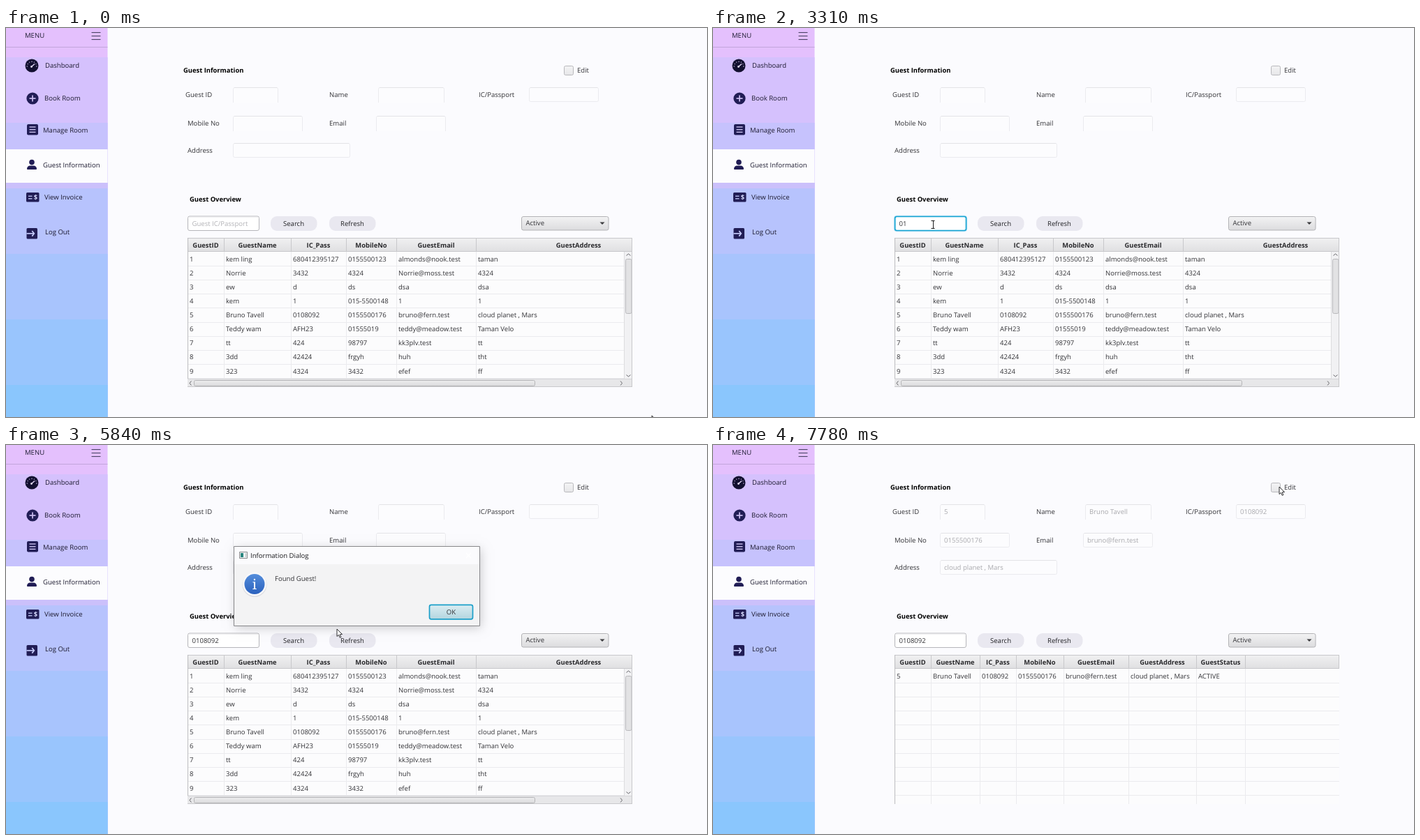
Animation, 1004 px wide and 558 px high, one loop 8 s. Source, as an HTML page with a canvas:

```html
<!DOCTYPE html>
<html lang="en">
<head>
<meta charset="utf-8">
<title>Guest Information</title>
<style>
html, body { margin: 0; width: 100%; height: 100%; overflow: hidden; background: #fbfbfe; }
canvas { display: block; }
</style>
</head>
<body>
<canvas id="stage" width="1004" height="558"></canvas>
<script>
const ctx = document.getElementById('stage').getContext('2d');
const LOOP = 8000, TICK = 76;
const FACE = '"Open Sans", "Noto Sans", sans-serif';
const NAVY = '#211d55', INK = '#333337', PAGE = '#fbfbfe', GRID = '#ebebee', EDGE = '#c8c8cb', GLYPH = '#66666a';

const GUEST_ID = '0108092';
const GUEST = ['5', 'Bruno Tavell', GUEST_ID, '0155500176', 'bruno@fern.test', 'cloud planet , Mars', 'ACTIVE'];
const HEADS = ['GuestID', 'GuestName', 'IC_Pass', 'MobileNo', 'GuestEmail', 'GuestAddress', 'GuestStatus'];
const ROWS = [
  ['1', 'kem ling', '680412395127', '0155500123', 'almonds@nook.test', 'taman'],
  ['2', 'Norrie', '3432', '4324', 'Norrie@moss.test', '4324'],
  ['3', 'ew', 'd', 'ds', 'dsa', 'dsa'],
  ['4', 'kem', '1', '015-5500148', '1', '1'],
  GUEST.slice(0, 6),
  ['6', 'Teddy wam', 'AFH23', '01555019', 'teddy@meadow.test', 'Taman Velo'],
  ['7', 'tt', '424', '98797', 'kk3plv.test', 'tt'],
  ['8', '3dd', '42424', 'frgyh', 'huh', 'tht'],
  ['9', '323', '4324', '3432', 'efef', 'ff']
];

// moments of each event, in ms
const FOCUS = 1380, HOVER = 5330, PRESS = 5430, DIALOG = 5740, CLOSE = 6680, RESULT = 6760;
const KEYS = [2080, 2700, 3470, 3850, 4090, 4410, 4950];
const BLINK = 605;

// the pointer's moves, each an eased and slightly bowed run to the next stop
const HOME = { x: 925, y: 556 };
const MOVES = [
  { from: 0, to: 760, x: 329, y: 314, bow: 36 },
  { from: 760, to: 1290, x: 315, y: 282, bow: 0 },
  { from: 5010, to: 5400, x: 408, y: 280, bow: 0 },
  { from: 5610, to: 6380, x: 650, y: 243, bow: -8 },
  { from: 6810, to: 7300, x: 808, y: 34, bow: -25 },
  { from: 7380, to: 7750, x: 811, y: 60, bow: 0 }
];

function pointerAt(t) {
  let { x, y } = HOME;
  for (const m of MOVES) {
    if (t < m.from) break;
    const k = 1 - (1 - Math.min(1, (t - m.from) / (m.to - m.from))) ** 1.3;
    x += (m.x - x) * k;
    y += (m.y - y) * k + m.bow * 4 * k * (1 - k);
  }
  return [Math.round(x), Math.round(y)];
}

function rect(x, y, w, h, fill) {
  ctx.fillStyle = fill;
  ctx.fillRect(x, y, w, h);
}

function box(x, y, w, h, r, fill, stroke, width = 1) {
  ctx.beginPath();
  ctx.roundRect(x, y, w, h, r);
  if (fill) { ctx.fillStyle = fill; ctx.fill(); }
  if (stroke) { ctx.strokeStyle = stroke; ctx.lineWidth = width; ctx.stroke(); }
}

function line(color, width, ...p) {
  ctx.beginPath();
  for (let i = 0; i < p.length; i += 2) ctx.lineTo(p[i], p[i + 1]);
  ctx.strokeStyle = color;
  ctx.lineWidth = width;
  ctx.stroke();
}

function shape(fill, ...p) {
  ctx.beginPath();
  for (let i = 0; i < p.length; i += 2) ctx.lineTo(p[i], p[i + 1]);
  ctx.closePath();
  ctx.fillStyle = fill;
  ctx.fill();
}

function disc(x, y, r, fill) {
  ctx.beginPath();
  ctx.arc(x, y, r, 0, Math.PI * 2);
  ctx.fillStyle = fill;
  ctx.fill();
}

function fade(y0, y1, a, b) {
  const g = ctx.createLinearGradient(0, y0, 0, y1);
  g.addColorStop(0, a);
  g.addColorStop(1, b);
  return g;
}

function text(s, x, mid, color = INK, bold = false, align = 'left') {
  ctx.font = bold ? `700 9.4px ${FACE}` : `9.55px ${FACE}`;
  ctx.textAlign = align;
  ctx.fillStyle = color;
  ctx.fillText(s, x, Math.round(mid + 3));
}

// small arrow head pointing along (dx, dy)
function chevron(x, y, dx, dy, size, color, width) {
  const tip = size * .8;
  line(color, width, x - dx * tip - dy * size, y - dy * tip - dx * size, x, y,
    x - dx * tip + dy * size, y - dy * tip + dx * size);
}

function sidebar() {
  for (let i = 0; i < 7; i++) {
    const y = i && 42 + 94 * (i - 1);
    rect(0, y, 145.5, 558 - y, `rgb(${228 - 15 * i}, ${192 + i}, 253)`);
  }
  rect(0, 174, 145.5, 48, '#fcfcfe');
  rect(0, 222, 145.5, 8, '#cbc0fb');
  rect(0, 27, 145.5, 1, '#c3a6dc');
  for (const y of [6.5, 11.5, 16.5]) line('#4b4463', 1.1, 122.5, y, 135.5, y);

  const item = (s, x, y) => text(s, x, y, '#1d1b30');
  item('MENU', 27, 11);
  item('Dashboard', 56, 54);
  item('Book Room', 55, 101);
  item('Manage Room', 53, 147);
  item('Guest Information', 53, 197);
  item('View Invoice', 55, 243);
  item('Log Out', 56, 293);

  disc(37, 54, 9.5, '#131030');
  for (let i = 0; i < 7; i++) {
    const a = Math.PI * (1 + i / 6);
    disc(37 + 6.8 * Math.cos(a), 55 + 6.8 * Math.sin(a), .7, '#d9c9f2');
  }
  line('#e8dcfa', 1.4, 36.5, 55.5, 41, 51.5);
  disc(36.5, 55.5, 1.4, '#e8dcfa');

  disc(38, 101, 8.6, NAVY);
  line('#cbbdf0', 1.7, 33.5, 101, 42.5, 101);
  line('#cbbdf0', 1.7, 38, 96.5, 38, 105.5);

  box(30, 138, 16, 15.5, 2, NAVY);
  for (let y = 142; y < 150; y += 3.7) line('#d6cdf8', 1.3, 33.5, y, 42.5, y);

  disc(37, 192.6, 3.8, NAVY);
  box(30, 197.5, 14, 5.5, [5, 5, 1, 1], NAVY);

  box(29, 236, 18.5, 13.5, 1.5, NAVY);
  for (const y of [241.2, 244.8]) line('#c5cbfb', 1.3, 32, y, 37.5, y);
  text('$', 42.5, 243, '#d5d9fc', true, 'center');

  box(29.5, 287, 15.5, 15.5, 1.5, NAVY);
  line('#c5cbfb', 1.7, 29.5, 294.8, 40, 294.8);
  chevron(40.3, 294.8, 1, 0, 3.8, '#c5cbfb', 1.7);
}

// an open field shows no lower edge
function formField(label, labelX, x, y, w, open, value) {
  text(label, labelX, y + 11);
  ctx.save();
  ctx.beginPath();
  ctx.rect(x - 2, y - 2, w + 4, open ? 24 : 30);
  ctx.clip();
  box(x + .5, y + .5, w - 1, open ? 28 : 20, 2, '#fcfcfe', '#ebebef');
  rect(x + 2, y, w - 4, 1, '#e3e3e7');
  ctx.restore();
  text(value, x + 6, y + 11, '#a9a9ad');
}

function form(found) {
  const [id, name, pass, mobile, email, address] = GUEST.map(s => found ? s : '');
  text('Guest Information', 254, 61, '#000', true);
  box(799.5, 54.5, 13, 13, 2, fade(54, 68, '#f4f4f5', '#e6e6e8'), '#b8b8bc');
  text('Edit', 818, 61);
  formField('Guest ID', 257, 325, 85, 65, true, id);
  formField('Name', 463, 533, 85, 95, true, name);
  formField('IC/Passport', 677, 749, 85, 100, false, pass);
  formField('Mobile No', 260, 325, 126, 100, !found, mobile);
  formField('Email', 463, 530, 126, 100, !found, email);
  formField('Address', 260, 325, 165, 168, false, address);
}

function button(label, x, hot) {
  box(x, 270, 66.5, 21, 9, hot ? '#640664' : '#e9e8f0');
  text(label, x + 33, 281, hot ? '#0c000c' : '#222226', hot, 'center');
}

function searchBar(t) {
  text('Guest Overview', 263, 246, '#000', true);
  const focused = t >= FOCUS && t < PRESS;
  if (focused) {
    box(259.5, 269.5, 104, 22, 3.5, null, 'rgba(60,180,225,.35)', 1.5);
    box(260.7, 270.5, 101.8, 20, 2.5, '#fff', '#13a2d1', 1.6);
  } else {
    box(260.5, 270, 102, 20.5, 2.5, '#fff', '#b6b6ba');
    line('#e9e9ec', 1, 262, 271.2, 361, 271.2);
  }
  const hits = KEYS.filter(k => t >= k);
  const typed = GUEST_ID.slice(0, hits.length);
  if (typed) text(typed, 266.5, 281);
  else if (!focused) text('Guest IC/Passport', 266.5, 281, '#b3b3b7');
  if (focused && t - (hits.pop() || FOCUS) < BLINK) {
    ctx.font = `9.55px ${FACE}`;
    rect(Math.round(266.8 + ctx.measureText(typed).width), 274, 1, 13, '#222');
  }

  button('Search', 379, t >= HOVER && t < DIALOG);
  button('Refresh', 463, false);
  box(738.5, 270.5, 124.5, 19.5, 2.5, fade(270, 290, '#f3f3f4', '#dcdcde'), '#b3b3b6');
  text('Active', 744.5, 280);
  shape('#3b3b3e', 850.5, 278.5, 857.5, 278.5, 854, 282);
}

// edges: left side of every column, then the end of the last one
function table(edges, rows, bottom) {
  const rowH = 20.12, deep = bottom - 321;
  rect(260, 321, 637, deep, '#fcfcfd');
  for (let y = 321 + rowH; y < bottom; y += rowH) rect(260, Math.round(y), 637, 1, GRID);
  rect(260, 301, 637, 20, fade(301, 321, '#f1f1f2', '#dfdfe1'));
  rect(260, 301, 637, 1, EDGE);
  rect(260, 320, 637, 1, EDGE);
  rect(896, 301, 1, 20, EDGE);
  edges.forEach((x, i) => {
    if (i && x < 897) {
      rect(x, 301, 1, 20, EDGE);
      rect(x, 321, 1, deep, GRID);
    }
    if (i < edges.length - 1) text(HEADS[i], (x + edges[i + 1]) / 2, 312, '#2a2a2d', true, 'center');
  });
  rows.forEach((row, r) => row.forEach((s, c) => text(s, edges[c] + 3, 331.6 + rowH * r)));
  rect(260, 301, 1, 214, '#bcbcbf');
}

function fullTable() {
  table([260, 312, 408, 487, 559, 673, 967], ROWS, 503);
  rect(885, 321, 1, 182, '#dcdcdf');
  rect(886, 321, 11, 182, '#f1f1f3');
  box(887.5, 331.5, 8.5, 78, 2, '#e2e2e4', '#b9b9bc');
  chevron(891.5, 324, 0, -1, 3, GLYPH, 1);
  chevron(891.5, 500, 0, 1, 3, GLYPH, 1);
  rect(260, 503, 637, 12, '#e7e7e9');
  rect(260, 503, 637, 1, '#d6d6d9');
  box(269.5, 505.5, 488, 8, 2, fade(505, 514, '#eeeeef', '#dadadc'), '#b4b4b7');
  chevron(263, 509.5, -1, 0, 3, GLYPH, 1);
  chevron(882.5, 509.5, 1, 0, 3, GLYPH, 1);
  rect(896, 301, 1, 214, EDGE);
  rect(260, 514, 637, 1, EDGE);
}

function resultTable() {
  table([260, 312, 382, 434, 502, 595, 692, 762], [GUEST], 515);
}

function dialog(alpha) {
  if (alpha <= 0) return;
  ctx.save();
  ctx.globalAlpha = alpha;
  ctx.shadowColor = 'rgba(0,0,0,.2)';
  ctx.shadowBlur = 14;
  ctx.shadowOffsetX = 2;
  ctx.shadowOffsetY = 3;
  rect(327, 146, 351, 113, '#f3f3f4');
  ctx.shadowColor = 'transparent';
  rect(327, 146, 351, 25, '#fbfbfd');
  box(326.5, 145.5, 352, 114, 0, null, '#88888b');

  box(334.5, 153.5, 11, 9, 0, '#f1f4f4', '#85898a');
  rect(336, 155, 4, 6, '#27857d');
  rect(343, 155, 1, 6, '#b4babb');
  text('Information Dialog', 350, 159, '#1c1c1f');
  line('#fff', 1.2, 659, 155, 666, 162);
  line('#fff', 1.2, 666, 155, 659, 162);

  disc(356, 200.5, 17.5, '#dcdce0');
  disc(356, 199.5, 17, '#f8f8fa');
  disc(356, 199.5, 14.5, fade(185, 214, '#548ddb', '#2b61bd'));
  ctx.font = '400 20px "Noto Serif", serif';
  ctx.textAlign = 'center';
  ctx.fillStyle = '#fff';
  ctx.fillText('i', 356, 207);
  text('Found Guest!', 385, 192);

  box(606.5, 229.3, 62, 20.5, 2.5, fade(229, 250, '#dcedf2', '#b2d5df'), '#1b9fc9', 1.7);
  text('OK', 637.5, 240, INK, false, 'center');
  ctx.restore();
}

function pointer(x, y) {
  ctx.save();
  ctx.translate(x, y);
  if (x < 363 && y > 268 && y < 291) {
    for (const s of [-5.5, 5.5]) line('#1b1b1d', 1, -2.5, s, 2.5, s);
    line('#1b1b1d', 1, .5, -5, .5, 5);
  } else {
    shape('#fff', 0, 0, 0, 10.5, 2.5, 8.4, 4.2, 12.3, 5.9, 11.6, 4.2, 7.8, 7.5, 7.5);
    ctx.strokeStyle = '#1a1a1c';
    ctx.lineWidth = .9;
    ctx.stroke();
  }
  ctx.restore();
}

function draw(t) {
  const held = Math.floor((t + 6) / TICK) * TICK;
  const found = t >= RESULT;
  rect(0, 0, 1004, 558, PAGE);
  sidebar();
  form(found);
  searchBar(t);
  if (found) resultTable(); else fullTable();
  if (t >= DIALOG) dialog(t < CLOSE ? Math.min(1, (t - DIALOG + 60) / 140) : 1 - (t - CLOSE) / 80);
  pointer(...pointerAt(held));
}

ctx.textRendering = 'geometricPrecision';
const start = performance.now();
function loop() {
  draw((performance.now() - start) % LOOP);
  requestAnimationFrame(loop);
}
loop();
</script>
</body>
</html>
```
